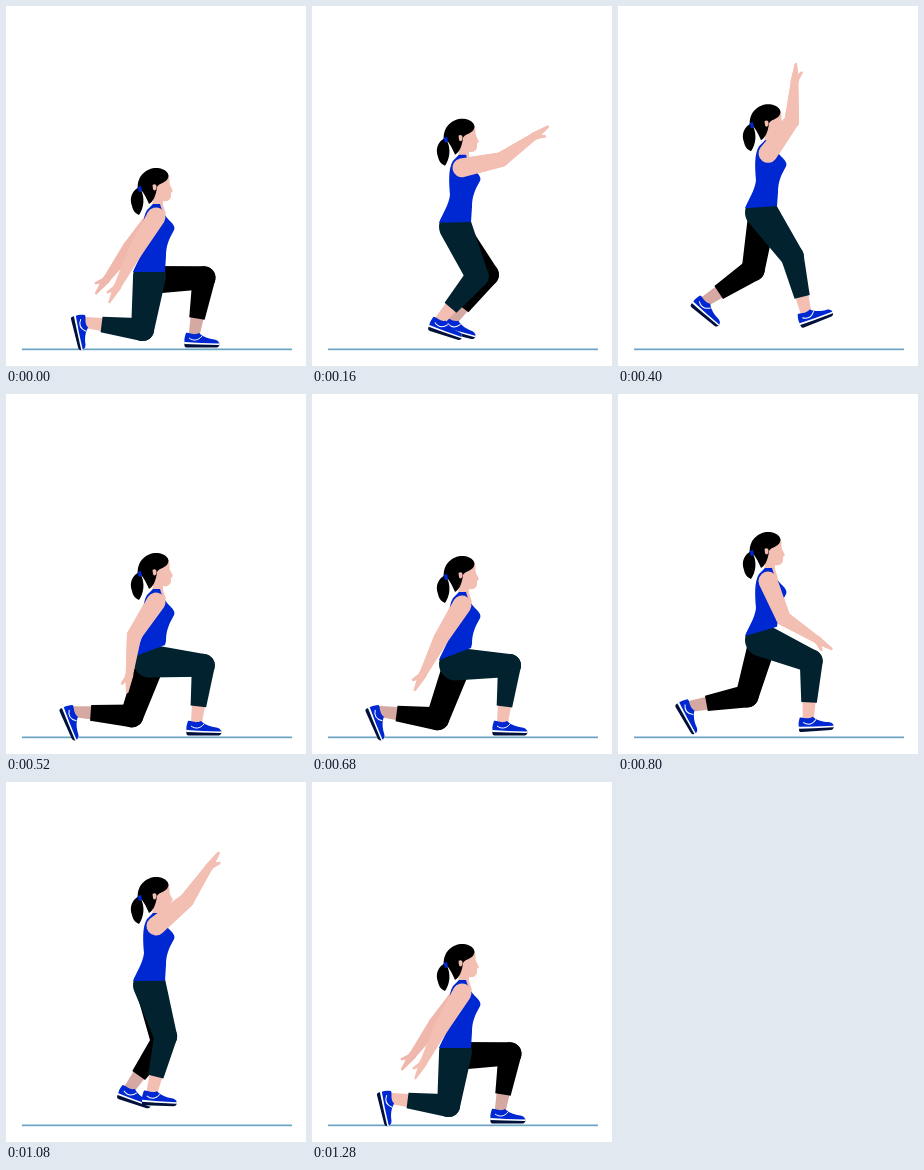
An HTML page with a canvas for the animation above (1.36 s loop, 300 by 360 pixels).

```html
<!DOCTYPE html>
<html lang="en">
<head>
<meta charset="utf-8">
<title>Jumping lunges</title>
<style>
  html, body { margin: 0; width: 100%; height: 100%; overflow: hidden; background: #fff; }
  canvas { display: block; }
</style>
</head>
<body>
<canvas id="stage" width="300" height="360"></canvas>
<script>
const ctx = document.getElementById('stage').getContext('2d');
const SKIN = '#f4bfb3', FAR_ARM = '#f0b7ac', FAR_SKIN = '#d5a8a1';
const BLUE = '#0028d2', TEAL = '#02222f', BLACK = '#000';
const LOOP = 1360, STEP = 40, HALF = 640;
const THIGH = 54, SHIN = 53, UPPER_ARM = 40, WRIST = 40, FINGERTIP = 57;
const RAD = Math.PI / 180;

// time, body lift, upper arm, forearm, near ankle x y angle, far ankle x y angle
const KEYS = [
  [0, 0, -121, -117, 84, 317, 76, 189, 324, 0],
  [40, -4, -104, -95, 87, 317, 70, 187, 324, 0],
  [120, -29, -25, 5, 114, 314, 36, 162, 318, 9],
  [200, -67, 40, 56, 147, 306, 2, 126, 303, 18],
  [320, -83, 69, 100, 179, 286, -27, 103, 285, 22],
  [360, -76, 71, 108, 184, 292, -28, 98, 286, 30],
  [440, -48, 12, 38, 189, 312, -12, 84, 301, 48],
  [520, -3, -123, -97, 191, 324, 0, 73, 318, 66],
  [600, 0, -122, -117, 191, 324, 0, 73, 318, 66],
  [640, 0, -121, -120, 191, 324, 0, 73, 318, 66]
];

function slope(i, c) {
  const a = KEYS[i - 1], b = KEYS[i], d = KEYS[i + 1];
  if (!a || !d || (b[c] - a[c]) * (d[c] - b[c]) <= 0) return 0;
  return (d[c] - a[c]) / (d[0] - a[0]);
}

function poseAt(time) {
  let i = 0;
  while (i < KEYS.length - 2 && KEYS[i + 1][0] <= time) i++;
  const a = KEYS[i], b = KEYS[i + 1], span = b[0] - a[0];
  const u = (time - a[0]) / span, v = 1 - u;
  return a.map((_, c) =>
    a[c] * v * v * (1 + 2 * u) + b[c] * u * u * (3 - 2 * u) +
    span * u * v * (slope(i, c) * v - slope(i + 1, c) * u));
}

function fill(path, color) {
  ctx.fillStyle = color;
  ctx.fill(new Path2D(path));
}

const polar = ([x, y], length, angle) => [x + length * Math.cos(angle), y + length * Math.sin(angle)];
const mix = (a, b, u) => [a[0] + (b[0] - a[0]) * u, a[1] + (b[1] - a[1]) * u];

// Tapered segment; a flat one ends in a straight edge
function limb(a, b, ra, rb, color, flat) {
  const angle = Math.atan2(b[1] - a[1], b[0] - a[0]), q = Math.PI / 2;
  ctx.fillStyle = color;
  ctx.beginPath();
  ctx.arc(...a, ra, angle + q, angle + 3 * q);
  if (flat) {
    ctx.lineTo(...polar(b, rb, angle - q));
    ctx.lineTo(...polar(b, rb, angle + q));
  } else ctx.arc(...b, rb, angle - q, angle + q);
  ctx.fill();
}

function shoe([x, y], angle) {
  ctx.save();
  ctx.translate(x, y);
  ctx.rotate(angle * RAD);
  fill('M-10 12L24 12C25 15 24 17.5 21 17.5L-8 17.5C-11 17.5-11 15-10 12Z', '#00103a');
  fill('M-10.5 11L23 11C25 13 25 14.5 24 15L4 14.5L-10.5 14Z', '#fff');
  fill('M-9 3C-6 2-2 6 4 3C8 7 14 9 19 9.5C23 10 24 12 24 13.5L6 13L-10.5 12C-11 9-10 6-9 3Z', BLUE);
  ctx.strokeStyle = '#fff';
  ctx.lineWidth = 1;
  ctx.stroke(new Path2D('M-6 8C-2 11 3 11 7 6'));
  ctx.restore();
}

// Two-bone leg with the knee bending forward; returns the thigh angle
function leg(hip, ankle, footAngle, hipRadius, pants, skin) {
  const dx = ankle[0] - hip[0], dy = ankle[1] - hip[1];
  const reach = Math.min(Math.hypot(dx, dy), THIGH + SHIN);
  const bend = Math.acos((THIGH ** 2 + reach ** 2 - SHIN ** 2) / (2 * THIGH * reach));
  const angle = Math.atan2(dy, dx) - bend;
  const knee = polar(hip, THIGH, angle), cuff = mix(knee, ankle, .78);
  limb(cuff, mix(knee, ankle, 1.08), 6.5, 5.5, skin);
  shoe(ankle, footAngle);
  limb(hip, knee, hipRadius, 11.5, pants);
  limb(knee, cuff, 11.5, 7.8, pants, true);
  return angle;
}

function arm(shoulder, upper, fore, color) {
  const a = -upper * RAD, b = -fore * RAD;
  const elbow = polar(shoulder, UPPER_ARM, a), wrist = polar(elbow, WRIST, b);
  limb(shoulder, elbow, 9.5, 7.3, color);
  limb(elbow, wrist, 7.3, 3.6, color);
  limb(wrist, polar(elbow, FINGERTIP, b), 4, 1.2, color);
  limb(wrist, polar(wrist, 11, b + .6), 3, 1.2, color);
}

function torso(thighAngle) {
  const hem = 266 - 12 * Math.max(0, Math.cos(thighAngle)) ** 3;
  fill('M148 170L163 169C164 174 163 177 164 179L167 185L165 187L165 190C165 194 161 196 157 195L157 199L160 208L150 214L140 207C144 202 147 200 147 193Z', SKIN);
  fill(`M147 198L154 198C156 206 160 211 164 215C168 219 170 222 167 226C163 233 160 240 160 250L159 ${hem}L127 266C130 258 137 248 138 238C137 226 136 212 141 204Z`, BLUE);
}

function hair() {
  fill('M134 181C126 184 123 192 126 200C127 206 131 208 133 209C138 202 139 192 135 184Z', BLACK);
  fill('M132 184C130 169 142 161 152 162C160 163 164 168 162 172C160 177 153 177 151 181C150 190 147 196 143 198C141 193 138 187 135 184Z', BLACK);
  fill('M131.5 181L135 180L136 185L133 186Z', BLUE);
  fill('M146.5 179C149 177 151 179 150.5 182C150 185 147.5 185 147 183Z', SKIN);
}

function draw(time) {
  const [, lift, upper, fore, nx, ny, na, fx, fy, fa] = poseAt(time);
  const shoulder = [150, 211 + lift];
  const trail = 9.5 * Math.max(0, 1 - time / 120);

  ctx.fillStyle = '#fff';
  ctx.fillRect(0, 0, 300, 360);
  ctx.fillStyle = '#6ba3c3';
  ctx.fillRect(16, 342.5, 270, 1.7);

  arm(shoulder, upper - trail, fore - trail, FAR_ARM);
  leg([144, 274 + lift], [fx, fy], fa, 14, BLACK, FAR_SKIN);
  const thigh = leg([143.5, 270 + lift], [nx, ny], na, 16.5, TEAL, SKIN);
  ctx.save();
  ctx.translate(0, lift);
  torso(thigh);
  hair();
  ctx.restore();
  arm(shoulder, upper, fore, SKIN);
}

const start = performance.now();
function tick() {
  const time = (performance.now() - start) % LOOP;
  const step = Math.floor(time / STEP) * STEP;
  // The jump plays forward, then backward, and rests for one step
  draw(step <= HALF ? step : Math.max(0, 2 * HALF - step));
  requestAnimationFrame(tick);
}
tick();
</script>
</body>
</html>
```
